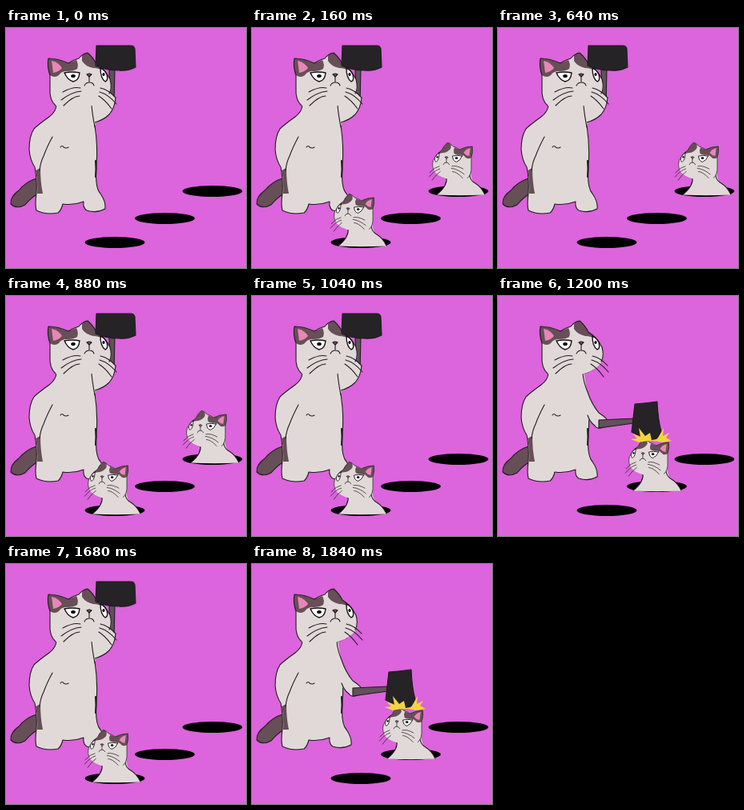
These frames come from a looping animation (300 by 300 pixels, 1920 ms). An HTML page:

```html
<!DOCTYPE html>
<html>
<head>
<meta charset="utf-8">
<style>
html, body { margin: 0; width: 100%; height: 100%; overflow: hidden; background: #dc64dc }
svg { display: block; width: 100%; height: 100% }
path { stroke-linejoin: round; stroke-linecap: round }
.fur { fill: #e1d9d8 }
.brown { fill: #664f56 }
.line { fill: none }
.dark { fill: #252326 }
.stick { fill: #62505a }
.line, .edge { stroke: #201a20; stroke-width: 1.1 }
.eye { fill: #fff; stroke: #151015; stroke-width: 1.4 }
</style>
</head>
<body>
<svg viewBox="0 0 300 300">
  <defs>
    <g id="head">
      <path class="fur" d="M55 59Q51 48 53 38Q65 38 78 44Q84 40 91 38Q96 32 102 31Q109 37 113 45Q124 52 130 64Q134 78 127 86Q118 95 104 98Q80 106 62 97Q54 89 55 75Z"/>
      <path class="brown" d="M55 59Q51 48 53 38Q65 38 78 44L88 40Q91 46 89 51Q85 54 76 54Q69 54 66 59Q61 63 55 59Z"/>
      <path class="brown" d="M95 35Q98 31 102 31Q109 37 113 45Q121 49 125 55Q116 50 109 50Q99 48 95 41Z"/>
      <path fill="#e886b8" d="M57 41Q66 43 70 50Q66 55 59 56Z"/>
      <path class="line" d="M62 97Q54 90 55 75V59Q51 48 53 38Q65 38 78 44Q84 40 91 38Q96 32 102 31Q109 37 113 45Q124 52 130 64Q133 75 129 82"/>
      <path class="eye" d="M73 56Q83 54 92 56Q91 66 84 67Q77 65 73 56Z"/>
      <path class="eye" d="M118 50Q123 52 126 58Q128 66 124 67Q118 63 118 50Z"/>
      <ellipse cx="84" cy="60" rx="2.8" ry="2"/>
      <ellipse cx="122" cy="58" rx="1.6" ry="2"/>
      <path fill="#725064" class="edge" stroke-width=".7" d="M101 58Q104 56 107 58L104 61Z"/>
      <path class="line" d="M104 61V68M98 72Q100 68 104 68Q109 68 110 72
        M93 75Q84 73 71 80M94 79Q82 80 69 90M92 85Q84 85 72 97
        M118 75Q128 77 137 87M117 80Q128 83 138 95M116 85Q124 90 132 101"/>
    </g>
    <g id="mole">
      <path class="fur" d="M243 180Q246 197 231 208.500Q260 210 291 208.500Q286 197 276 192L272 178Z"/>
      <path class="line" stroke-width=".8" d="M243 186Q245 197 231 208M272 184Q273 191 279 194Q287 199 291 208"/>
      <use href="#head" transform="translate(309 122.5) scale(-.635 .67)"/>
    </g>
  </defs>

  <rect width="300" height="300" fill="#dc64dc"/>
  <ellipse cx="136" cy="268" rx="37.5" ry="7"/>
  <ellipse cx="198.500" cy="238" rx="37.5" ry="7"/>
  <ellipse cx="258" cy="204" rx="37.5" ry="7"/>

  <path class="brown edge" d="M38 188Q25 192 16 203Q5 211 6 220Q13 227 24 221Q31 212 42 206Z"/>

  <g id="raised">
    <path class="stick edge" d="M129 50L136 50L135 96L130 97Z"/>
    <path class="fur" d="M104 90L129 80L137 88Q136 100 129 108Q121 116 108 120Z"/>
    <path class="line" d="M137 87Q136 100 129 108Q122 115 111 118"/>
  </g>
  <path class="fur" d="M63 95Q62 105 54 111Q40 121 35 126Q29 135 29 152Q30 165 36 174Q39 190 38 206Q36 221 38 228Q50 234 65 231Q69 228 71 220Q84 222 97 217Q96 225 101 228Q113 232 124 226Q125 217 118 207Q111 200 113 172Q115 148 111 118L107 94Z"/>
  <path class="line" d="M63 97Q62 105 54 111Q40 121 35 126Q29 135 29 152Q30 165 36 174Q39 190 38 206Q36 221 38 228Q50 234 65 231Q69 228 71 220Q84 222 97 217Q96 225 101 228Q113 232 124 226Q125 217 118 207Q111 200 113 172Q115 148 111 122"/>
  <path class="brown" d="M37 178L43 175Q43 193 46 207L39 207Q40 192 37 178Z"/>
  <path class="line" d="M58 136Q51 149 47 160Q43 168 42 178M68 149Q70 146 72 149Q75 151 78 149"/>
  <path class="line" style="stroke-width:2" d="M112 166Q113 176 112 186"/>

  <g id="lowered">
    <path class="fur" d="M100 92L106 97Q107 108 112 120Q117 135 126 146Q137 153 139 159Q137 164 132 164Q124 167 121 162Q114 158 108 145Z"/>
    <path class="line" d="M129 82Q119 95 106 97Q107 108 112 120Q117 135 126 146Q137 153 139 159Q137 164 132 164Q124 167 121 162Q115 158 112 149"/>
  </g>
  <path id="neckline" class="line" d="M107 97Q108 108 111 124"/>
  <use href="#head"/>
  <path id="mallet" class="dark edge" d="M113 22H156Q160 22 161 26L162 49Q153 54 141 53Q124 53 112 47Z"/>

  <g id="hammer">
    <path class="stick edge" d="M126 155L171 153L170 159L126 165Z"/>
    <path class="dark edge" d="M171 135Q185 134 199 132Q200 155 204 169Q201 178 194 180Q178 176 167 170Z"/>
  </g>

  <use id="front" href="#mole"/>
  <use id="middle" href="#mole"/>
  <use id="back" href="#mole"/>

  <path id="crown" fill="#f3d63d" d="M166 179L174 178L168 172L178 176L176 165L184 175L190 171L192 180L199 179L207 165L206 175L214 171L210 177L217 181L205 183Q192 179 176 183Z"/>
</svg>
<script>
const FRAME = 80, LOOP = 1920, BEATS = 8;
const el = id => document.getElementById(id);
const show = (on, ...ids) => ids.forEach(id => el(id).style.display = on ? '' : 'none');

// The mole is drawn at the back hole; the other two are shifted copies.
el('front').setAttribute('transform', 'translate(-123 64)');
el('middle').setAttribute('transform', 'translate(-62 35)');

function draw(now) {
  const step = Math.floor(now % LOOP / FRAME);
  const beat = step % BEATS;
  const hit = beat === 7;
  show(beat >= 1 && beat <= 5, 'front');
  show(beat >= 6, 'middle');
  show(step > 0 && beat <= 3, 'back');
  show(!hit, 'raised', 'mallet', 'neckline');
  show(hit, 'lowered', 'hammer', 'crown');
}

const start = performance.now();
function tick() {
  draw(performance.now() - start);
  requestAnimationFrame(tick);
}
tick();
</script>
</body>
</html>
```
